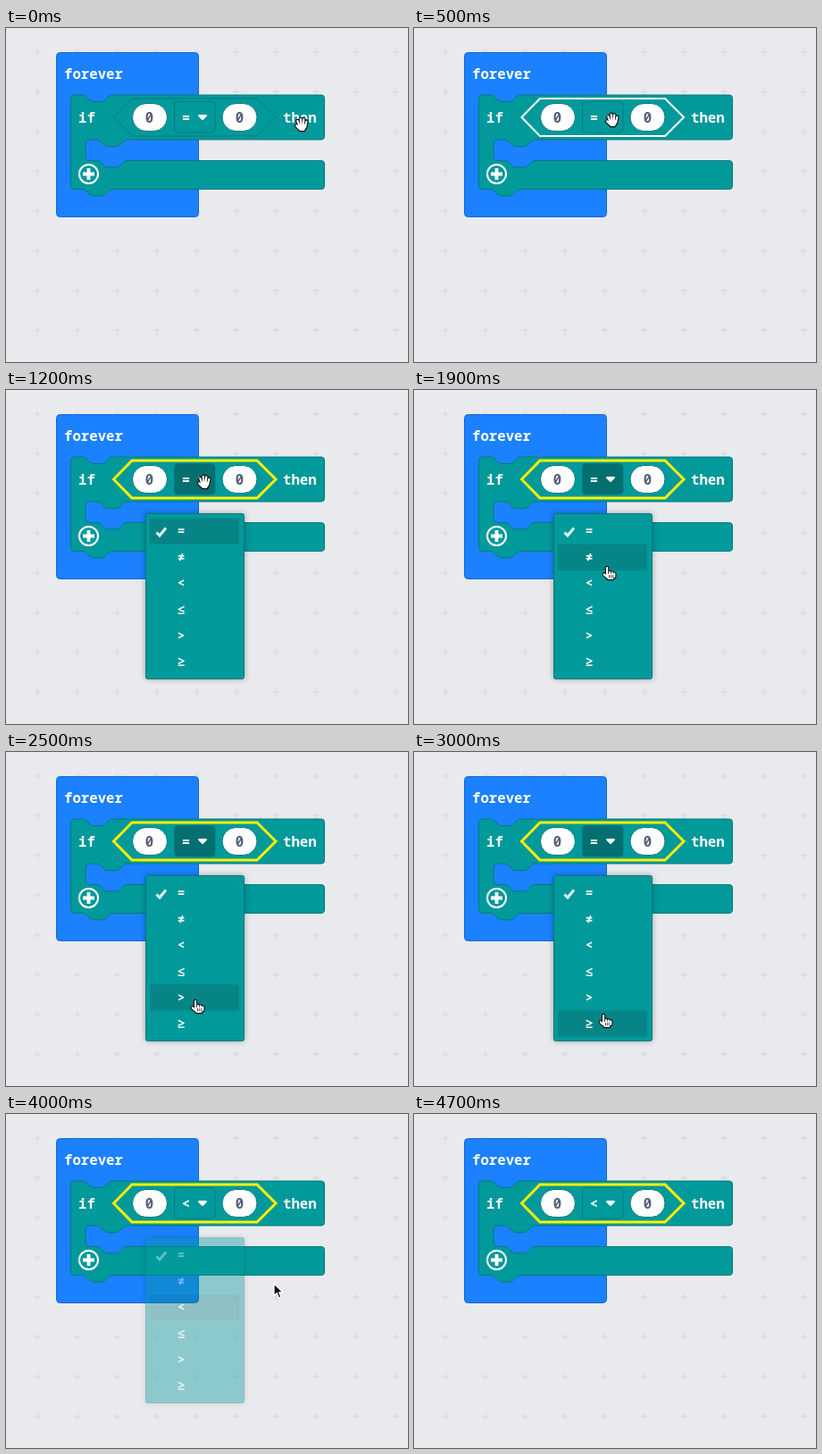
Animation of 450x374 px, one loop 4800 ms. Source, as an HTML page:

```html
<!DOCTYPE html>
<html lang="en">
<head>
<meta charset="utf-8">
<title>Choosing a comparison</title>
<style>
  html, body { margin: 0; width: 100%; height: 100%; overflow: hidden; background: #e9eaee; }
  svg { display: block; }
  text { font: 600 15.7px "Noto Sans Mono", "DejaVu Sans Mono", monospace; fill: #fff; white-space: pre; }
  .num { fill: #575e75; text-anchor: middle; }
  .mid { text-anchor: middle; }
  .item { font-size: 14.5px; text-anchor: middle; }
  .teal { fill: #02999b; stroke: #067a7c; }
  #menu { filter: drop-shadow(0 0 3px rgba(0, 0, 0, .3)); }
</style>
</head>
<body>
<svg width="450" height="374" viewBox="0 0 450 374">
  <defs>
    <pattern id="grid" x="13" y="4.5" width="44.5" height="44.5" patternUnits="userSpaceOnUse">
      <path d="M18.5 22.5h8M22.5 18.5v8" stroke="#d5d6da" fill="none"/>
    </pattern>
    <path id="fingers" d="M-4.6 -3.8L-2.6 2M-1.2 -6.2L-.6 1M2.2 -5.6L1.6 1M5.3 -3.2L4 3M-5.8 1.4L-2.4 5"/>
    <path id="palm" d="M-3.4 0H4.6L4 5L2.8 7H-1.8L-4 4Z"/>
    <path id="knuckles" d="M.6 1V9M3.6 6V9M6.4 6.6V10M8.8 7.6V11M-2.8 8.4L.6 11.4"/>
    <path id="fist" d="M0 8H9.2L8.8 11L7.4 14H1.6L-.4 11Z"/>
  </defs>
  <rect width="450" height="374" fill="url(#grid)"/>

  <rect x="56.5" y="27.5" width="159" height="184" rx="4" fill="#1b81ff" stroke="#1769cf"/>
  <text x="65" y="57">forever</text>

  <path class="teal" d="M72.5 79q0-4 4-4H85c3 0 4 1 6 3l2 2c2 2 3 2.500 6 2.500H106c3 0 4-.5 6-2.500l2-2c2-2 3-3 6-3H353q3.500 0 3.500 3.500V121.500q0 3.500-3.500 3.500H136c-3 0-4 1-6 3l-2 2c-2 2-3 2.500-6 2.500H115c-3 0-4-.5-6-2.500l-2-2c-2-2-3-3-6-3H93q-4 0-4 4V144.500q0 4 4 4H101c3 0 4 1 6 3l2 2c2 2 3 2.500 6 2.500H122c3 0 4-.5 6-2.500l2-2c2-2 3-3 6-3H353q3.500 0 3.500 3.500V177q0 3.500-3.500 3.500H120c-3 0-4 1-6 3l-2 2c-2 2-3 2.500-6 2.500H99c-3 0-4-.5-6-2.500l-2-2c-2-2-3-3-6-3H76.500q-4 0-4-4Z"/>
  <path d="M89 146V129q0-4 4-4H101c3 0 4 1 6 3l2 2c2 2 3 2.500 6 2.500H122c3 0 4-.5 6-2.500l2-2c2-2 3-3 6-3H358V148.500H136c-3 0-4 1-6 3l-2 2c-2 2-3 2.500-6 2.500H115c-3 0-4-.5-6-2.500l-2-2c-2-2-3-3-6-3H93q-4 0-4-4Z" fill="none"/>
  <text x="81" y="106">if</text>
  <text x="310" y="106">then</text>
  <g fill="none" stroke="#fff">
    <circle cx="92.500" cy="163.500" r="10.500" stroke-width="2"/>
    <path d="M86 163.500h13M92.500 157v13" stroke-width="3.800"/>
  </g>

  <path id="hex" class="teal" d="M120.500 100L141 79H281L302 100L281 121H141Z"/>
  <g fill="#fff" stroke="#067a7c">
    <rect x="141.500" y="84.500" width="39" height="31" rx="15.500"/>
    <rect x="242" y="84.500" width="39" height="31" rx="15.500"/>
  </g>
  <text class="num" x="160.500" y="106">0</text>
  <text class="num" x="261.500" y="106">0</text>
  <rect id="field" class="teal" x="188.500" y="82.500" width="45.500" height="34.500" rx="4"/>
  <text id="sign" class="mid" x="201.500" y="106">=</text>
  <path d="M216 98h8l-4 4Z" fill="#fff" stroke="#fff" stroke-width="2" stroke-linejoin="round"/>

  <g id="menu">
    <rect class="teal" x="156.500" y="138.500" width="110" height="185" rx="2"/>
    <rect id="row" x="161" width="100" height="29.200" rx="2" fill="#078586"/>
    <path d="M168.500 159.500l3.500 3.500L179 154.500" fill="none" stroke="#e3f6f6" stroke-width="3"/>
    <g id="items"></g>
  </g>

  <g id="cursor" stroke-linecap="round" stroke-linejoin="round">
    <g id="palmHand">
      <use href="#palm" fill="#111" stroke="#111" stroke-width="2.600"/>
      <use href="#fingers" fill="none" stroke="#111" stroke-width="4.600"/>
      <use href="#palm" fill="#fff"/>
      <use href="#fingers" fill="none" stroke="#fff" stroke-width="2.300"/>
    </g>
    <g id="pointHand">
      <use href="#fist" fill="#111" stroke="#111" stroke-width="2.600"/>
      <use href="#knuckles" fill="none" stroke="#111" stroke-width="4.400"/>
      <use href="#fist" fill="#fff"/>
      <use href="#knuckles" fill="none" stroke="#fff" stroke-width="2.200"/>
      <path d="M3 9.500v2.500M5.200 9.500v2.500M7.300 9.500v2.500" stroke="#111" stroke-width=".8"/>
    </g>
    <path id="arrow" d="M0 0V13.500L3.200 10.500L5.600 16L8 15L5.700 9.700H10Z" fill="#111" stroke="#fff" stroke-width="1.200"/>
  </g>
</svg>
<script>
const LOOP = 4800, STEP = 100;
const ROW_TOP = 143.5, ROW_H = 29.2;
const SIGNS = ["=", "≠", "<", "≤", ">", "≥"];
const PICK = 2;

// Cursor hot spot: step, x, y
const PATH = [
  [0, 331, 108], [1, 318, 107], [2, 280, 105], [3, 238, 103], [4, 222, 103],
  [12, 222, 103], [13, 221, 110], [14, 219, 132], [15, 217, 162], [16, 216, 184],
  [18, 215.5, 198], [19, 215.5, 198], [21, 214, 210], [23, 212, 245], [25, 211.5, 278],
  [27, 211.5, 295], [30, 211.5, 294], [32, 213, 277], [34, 215, 238], [36, 217, 216],
  [39, 217, 215], [40, 300, 190], [41, 418, 160]
];
// Menu visibility: step, opacity, lift
const MENU = [[0, 0, 0], [6, .35, -5], [7, .85, -1], [8, 1, 0], [40, .4, 0], [41, 0, 0]];

const $ = id => document.getElementById(id);
const show = (id, on) => { $(id).style.display = on ? "" : "none"; };

$("items").innerHTML = SIGNS.map((s, i) =>
  `<text class="item" x="196" y="${ROW_TOP + ROW_H * i + 19.5}">${s.replace("<", "&lt;")}</text>`).join("");

function place(n) {
  const i = PATH.findIndex(p => p[0] >= n);
  if (i <= 0) return PATH[0].slice(1);
  const [a, ax, ay] = PATH[i - 1], [b, bx, by] = PATH[i];
  const k = (n - a) / (b - a);
  return [ax + (bx - ax) * k, ay + (by - ay) * k];
}

function draw(n) {
  const inView = n <= 41;
  const [x, y] = place(Math.min(n, 41));
  show("cursor", inView);
  $("cursor").setAttribute("transform", `translate(${x} ${y})`);
  show("palmHand", n < 14);
  show("pointHand", n >= 14 && n < 36);
  show("arrow", n >= 36);

  const open = n >= 6 && n < 40;
  const [, opacity, lift] = MENU.filter(m => m[0] <= n).pop();
  show("menu", opacity > 0);
  $("menu").setAttribute("opacity", opacity);
  $("menu").setAttribute("transform", `translate(0 ${lift})`);
  const over = n >= 39 ? PICK : Math.max(0, Math.min(5, Math.floor((y - ROW_TOP) / ROW_H)));
  $("row").setAttribute("y", ROW_TOP + ROW_H * over);

  const hex = $("hex").style;
  hex.stroke = n >= 6 ? "#fff200" : n >= 2 ? "#fff" : "";
  hex.strokeWidth = n >= 6 ? 3 : n >= 2 ? 2 : 1;
  $("field").style.fill = open ? "#046f71" : "";
  $("sign").textContent = n >= 40 ? SIGNS[PICK] : SIGNS[0];
}

const start = performance.now();
function tick() {
  draw(Math.floor((performance.now() - start) % LOOP / STEP));
  requestAnimationFrame(tick);
}
tick();
</script>
</body>
</html>
```
